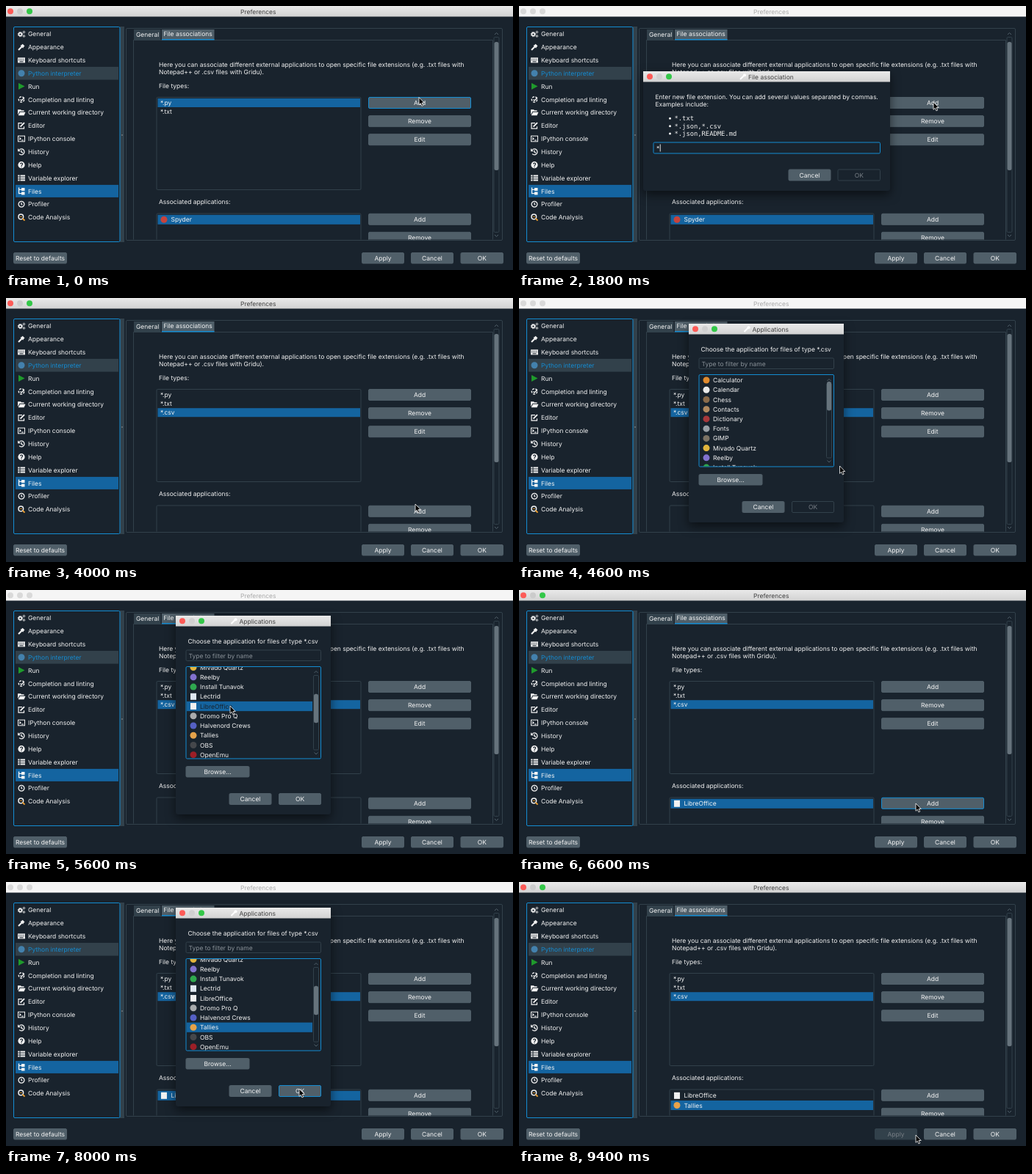
An HTML page that plays this animation: 690 px wide and 360 px high, repeating every 9600 ms.

```html
<!DOCTYPE html>
<html lang="en">
<head>
<meta charset="utf-8">
<title>Preferences</title>
<style>
  html, body { margin: 0; width: 100%; height: 100%; overflow: hidden; background: #19232d; }
  svg { display: block; width: 690px; height: 360px; }
  text { font: 8.47px Inter, "Open Sans", sans-serif; fill: #f4f4f4; white-space: pre; text-rendering: geometricPrecision; }
  .mono { font: 8.8px "DejaVu Sans Mono", monospace; }
  .dialog { filter: drop-shadow(0 5px 7px rgba(0, 0, 0, .55)); }
</style>
</head>
<body>
<svg id="stage" viewBox="0 0 690 360">
  <defs>
    <linearGradient id="bar" x2="0" y2="1"><stop stop-color="#e9e9e9"/><stop offset="1" stop-color="#d2d2d2"/></linearGradient>
    <clipPath id="pane"><path d="M164 31H663V318.500H164Z"/></clipPath>
    <clipPath id="apps"><path d="M246 105H417V229.500H246Z"/></clipPath>
  </defs>
</svg>
<script>
const BG = '#19232d', LINE = '#32414b', GREY = '#505f69', BLUE = '#148cd2', SEL = '#1464a0', WHITE = '#f4f4f4', DIM = '#787f86';
const LOOP = 9600, STEP = 200;
const stage = document.getElementById('stage');

function el(tag, attrs, parent = stage) {
  const node = document.createElementNS('http://www.w3.org/2000/svg', tag);
  set(node, attrs);
  parent.append(node);
  return node;
}
function set(node, attrs) {
  for (const key in attrs) node.setAttribute(key, attrs[key]);
}
const show = (node, on) => set(node, { visibility: on ? 'visible' : 'hidden' });
const group = (parent, attrs = {}) => el('g', attrs, parent);
const rect = (parent, x, y, width, height, fill, more = {}) => el('rect', { x, y, width, height, fill, ...more }, parent);
const frame = (parent, x, y, w, h, stroke, fill = 'none') =>
  rect(parent, x + .5, y + .5, w - 1, h - 1, fill, { stroke, rx: 1.5 });
const path = (parent, d, more = {}) => el('path', { d, fill: 'none', stroke: WHITE, ...more }, parent);
const dot = (parent, cx, cy, r, fill) => el('circle', { cx, cy, r, fill }, parent);

// Text is placed by its vertical middle.
function label(parent, x, mid, str, more = {}) {
  const node = el('text', { x, y: mid + 3.1, ...more }, parent);
  node.textContent = str;
  return node;
}

const buttons = [];
function button(parent, layer, x, y, w, h, str) {
  const box = frame(parent, x, y, w, h, GREY, GREY);
  const text = label(parent, x + w / 2, y + h / 2, str, { 'text-anchor': 'middle' });
  const b = { box, text, layer, x, y, w, h, enabled: true };
  buttons.push(b);
  return b;
}

function scrollbar(parent, x, top, bottom) {
  frame(parent, x - 4, top + 4, 8, bottom - top - 8, LINE);
  path(parent, `M${x - 2.5} ${top + 1}l2.500 -2.500l2.500 2.500M${x - 2.5} ${bottom - 1}l2.500 2.500l2.500 -2.500`, { stroke: GREY });
}

function badge(parent, x, y, fill, square) {
  return square ? rect(parent, x - 4, y - 4.5, 8, 9, fill) : dot(parent, x, y, 4.5, fill);
}

function titleBar(parent, x, y, w, str, textX) {
  const fill = rect(parent, x, y, w, 14.5, 'url(#bar)');
  const lights = ['#fc5b57', '#d0d0d0', '#33c748'].map((c, i) => dot(parent, x + 6 + 13 * i + (x ? 3 : 0), y + 7.2, 4, c));
  const text = label(parent, textX, y + 7.4, str, { style: 'fill:#404040' });
  return { fill, lights, text };
}

/* Main window */
rect(stage, 0, 0, 690, 360, BG);
const mainBar = titleBar(stage, 0, 0, 690, 'Preferences', 319);
const main = group(stage);

const gear = (x, y, r) => `<circle cx="${x}" cy="${y}" r="${r}" stroke-width="${r * .8}"/>` +
  `<circle cx="${x}" cy="${y}" r="${r * 1.6}" stroke-width="${r * .5}" stroke-dasharray="${r * .63}"/>`;
const line = (d, w = 1.2) => `<path d="${d}" stroke-width="${w}"/>`;
const solid = (d, c = WHITE) => `<path d="${d}" fill="${c}" stroke="none"/>`;
const sections = [
  ['General', gear(-1.6, .4, 2) + gear(3.4, -2.6, 1) + gear(3.4, 2.8, 1)],
  ['Appearance', line('M-4 4L1 -1', 2.2) + line('M1 -1L3 -3', 4) + line('M-1 -2.500L2.500 1')],
  ['Keyboard shortcuts', solid('M-5 -3.500H5V3.500H-5Z') +
    `<path d="M-4 -1.500H4.500M-4 .3H4.500" stroke="${BG}" stroke-dasharray="1 1"/><path d="M-2.500 2H2.500" stroke="${BG}"/>`],
  ['Python interpreter', '<circle r="4.500" fill="#4381ad" stroke="none"/>'],
  ['Run', solid('M-4 -4.500L4.500 0L-4 4.500Z', '#1f9a2c')],
  ['Completion and linting', '<circle r="3.700" stroke-width="1.400" stroke-dasharray="3 1.600"/>' + line('M-1.500 0L0 1.500L4 -2.500', 1.4)],
  ['Current working directory', solid('M-5 3V-4H-1L0 -3H3.500V-1.500H-2.500ZM-4.300 4L-2 -.5H5.500L3.500 4Z')],
  ['Editor', line('M1 -3.500H-4V4H3.500V1') + line('M-1.500 1.500L4 -4', 2)],
  ['IPython console', '<rect x="-4.500" y="-3.800" width="9" height="7.600"/>' + line('M-2.800 -1.500L-1 0L-2.800 1.500M0 2H3')],
  ['History', line('M-3 -2.700A4 4 0 1 1 -3 2.800M0 -2.200V.3L2 1.500', 1.3) + solid('M-5 -4.500V-.6H-1Z')],
  ['Help', `<circle r="4.600" fill="${WHITE}" stroke="none"/><path d="M-1.500 -1.200C-1.500 -3 1.700 -3 1.600 -1.200C1.500 0 0 0 0 1.200M0 2V3.200" stroke="${BG}" stroke-width="1.200"/>`],
  ['Variable explorer', line('M-4.800 -3H-2.500M-4.800 0H-2.500M-4.800 3H-2.500M-1.500 -3H5M-1.500 0H5M-1.500 3H5', 2)],
  ['Files', line('M-3.500 -5V3.200H0M-3.500 -2H0', 1.3) + solid('M0 -4.500H4.500V-.5H0ZM0 1H4.500V5H0Z')],
  ['Profiler', '<circle r="3.900" stroke-width="1.300"/>' + line('M0 -2.300V.5H1.500')],
  ['Code Analysis', '<circle cx="-.7" cy="-.7" r="3.300" stroke-width="1.500"/>' + `<path d="M1.500 1.500L4.500 4.500" stroke="#f0a030" stroke-width="2"/><path d="M-2.200 -.7H.8" stroke="#f0a030"/>`],
];
rect(main, 155, 28, 6, 294, LINE);
dot(main, 158, 176, .9, DIM);
frame(main, 10, 28, 145.5, 294, BLUE, BG);
sections.forEach(([name, icon], i) => {
  const y = 38.2 + 17.85 * i, hover = i === 3;
  if (hover) rect(main, 13, y - 8.8, 140, 17.6, LINE);
  if (name === 'Files') rect(main, 13, y - 8.5, 140, 17, SEL);
  group(main, { transform: `translate(21 ${y})`, fill: 'none', stroke: WHITE }).innerHTML = icon;
  label(main, 30, y, name, hover ? { style: 'fill:' + BLUE } : {});
});

frame(main, 163, 30, 513, 290, LINE);
const pane = group(main, { 'clip-path': 'url(#pane)' });
path(pane, 'M173.500 330V46.500H662.500V330', { stroke: LINE });
rect(pane, 174, 32, 36.500, 14, LINE);
rect(pane, 212, 32, 71.500, 14, GREY);
rect(pane, 212, 45, 71.500, 1.500, BLUE);
label(pane, 177, 38.7, 'General');
label(pane, 214.500, 38.2, 'File associations');
label(pane, 208, 79.8, 'Here you can associate different external applications to open specific file extensions (e.g. .txt files with');
label(pane, 208, 90.2, 'Notepad++ or .csv files with Gridu).');
label(pane, 208, 108.6, 'File types:');
label(pane, 208, 267.300, 'Associated applications:');
frame(pane, 204.500, 124, 279, 127, LINE);
frame(pane, 204.500, 282.500, 279, 60, LINE);
['Add', 'Remove', 'Edit'].forEach((s, i) => button(pane, 'main', 493, 124 + 25.1 * i, 140, 16, s));
['Add', 'Remove'].forEach((s, i) => button(pane, 'main', 493, 282.800 + 25.1 * i, 140, 16, s));
scrollbar(main, 667.5, 38, 313);
rect(main, 664.500, 49, 6, 175, '#66737c', { rx: 2.5 });

const typeSel = rect(pane, 206.500, 126, 275.500, 12, SEL);
const types = ['*.py', '*.txt', '*.csv'].map((s, i) => label(pane, 210, 132 + 12.1 * i, s));
const linkSel = rect(pane, 206.500, 284.800, 275.500, 13, SEL);
function link(name, row, fill, square) {
  const g = group(pane), y = 291.300 + 13.2 * row;
  badge(g, 215, y, fill, square);
  label(g, 224.500, y, name);
  return g;
}
const links = {
  spyder: link('Spyder', 0, '#c8433c'),
  office: link('LibreOffice', 0, '#f1f1f1', true),
  sheet: link('Tallies', 1, '#e5a24a'),
};

button(main, 'main', 10, 336, 73, 15.500, 'Reset to defaults');
const apply = button(main, 'main', 484, 336, 58, 15.500, 'Apply');
button(main, 'main', 551, 336, 58, 15.500, 'Cancel');
button(main, 'main', 618.500, 336, 58.500, 15.500, 'OK');

/* Dialogs */
function dialog(x, y, w, h, title, textX) {
  const g = group(stage, { class: 'dialog' });
  rect(g, x, y, w, h, BG, { rx: 3 });
  titleBar(g, x, y, w, title, textX);
  path(g, `M${textX - 11} ${y + 11}l5 -5`, { stroke: '#fff', 'stroke-width': 2 });
  dot(g, textX - 5, y + 5.2, 2, '#fff');
  return g;
}

const ext = dialog(169, 89, 336, 163, 'File association', 312);
label(ext, 185.500, 123.7, 'Enter new file extension. You can add several values separated by commas.');
label(ext, 185.500, 134.2, 'Examples include:');
['*.txt', '*.json,*.csv', '*.json,README.md'].forEach((s, i) => {
  dot(ext, 205.500, 153.3 + 10.4 * i, 1.5, WHITE);
  label(ext, 211.500, 153.200 + 10.4 * i, s, { class: 'mono' });
});
frame(ext, 182.500, 185.500, 309.500, 16, BLUE);
const typed = label(ext, 187, 193.500, '');
const caret = rect(ext, 187, 188.500, .9, 10, WHITE);
button(ext, 'ext', 366.500, 222.500, 58, 16, 'Cancel');
const extOk = button(ext, 'ext', 433.500, 222.500, 58.500, 16, 'OK');

const ROW = 13.23;
const apps = dialog(231, 35, 211, 271, 'Applications', 317.5);
label(apps, 247.500, 70, 'Choose the application for files of type *.csv');
frame(apps, 244.500, 81.500, 184.500, 15.500, LINE);
label(apps, 248.500, 89.5, 'Type to filter by name', { style: 'fill:#8a9299' });
frame(apps, 244.500, 104, 184.500, 126.500, BLUE);
const clip = group(apps, { 'clip-path': 'url(#apps)' });
const list = group(clip);
const rows = [
  ['Calculator', '#e08a2e'], ['Calendar', '#e9e9e9'], ['Chess', '#8b6b4a'], ['Contacts', '#b28a60'],
  ['Dictionary', '#a8383b'], ['Fonts', '#9aa0a6'], ['GIMP', '#7d7364'], ['Mivado Quartz', '#e3b53c'],
  ['Reelby', '#8272cf'], ['Install Tunavok', '#2fa84f'], ['Lectrid', '#dfe8f2', 1], ['LibreOffice', '#f1f1f1', 1],
  ['Dromo Pro Q', '#a9abad'], ['Halvenord Crews', '#5560c4'], ['Tallies', '#e5a24a'], ['OBS', '#45474b'], ['OpenEmu', '#9c1f27'],
].map(([name, fill, square], i) => {
  const y = 112 + ROW * i;
  const back = rect(list, 246, y - ROW / 2, 171, ROW, SEL);
  badge(list, 255, y, fill, square);
  return { back, text: label(list, 264, y, name) };
});
scrollbar(apps, 422, 112, 222.5);
const thumb = rect(apps, 419, 114, 6, 39.500, '#66737c', { rx: 2.5 });
button(apps, 'apps', 244.500, 240, 87, 15.500, 'Browse...');
button(apps, 'apps', 303.500, 277, 58, 16, 'Cancel');
const appsOk = button(apps, 'apps', 371, 277, 58, 16, 'OK');

const pointer = path(stage, 'M0 0V10.300L2.300 8.200L3.900 11.900L5.700 11.100L4.100 7.500H7.200Z', { fill: '#000', stroke: '#fff', 'stroke-width': .8 });

/* Timeline */
const cursorKeys = [
  [0, 562, 124.5], [200, 564, 131], [2400, 564, 131], [2800, 463, 229], [3200, 463, 229],
  [3600, 545, 265], [4000, 557, 281], [4200, 558, 288], [4400, 558, 288], [4800, 315, 170],
  [5400, 305, 158], [5600, 305, 158], [6000, 399, 282], [6200, 399, 282], [6600, 540, 291],
  [7000, 540, 291], [7400, 310, 190], [7600, 305, 197], [8000, 399, 282], [8200, 399, 282], [8400, 540, 345],
];
const scrollKeys = [[4800, 0], [5200, 99], [6200, 99], [6400, 0], [7200, 0], [7400, 99]];
const typing = [[0, ''], [1800, '*'], [2000, '*.'], [2200, '*.cs'], [2400, '*.csv']];

function tween(keys, t) {
  const i = keys.findIndex(k => k[0] > t);
  if (i < 0) return keys[keys.length - 1].slice(1);
  if (!i) return keys[0].slice(1);
  const a = keys[i - 1], b = keys[i];
  const p = (t - a[0]) / (b[0] - a[0]), e = p * p * (3 - 2 * p);
  return a.slice(1).map((v, n) => v + (b[n + 1] - v) * e);
}
const within = (t, from, to) => t >= from && t < to;

function render(t) {
  const extOpen = within(t, 800, 3200);
  const appsOpen = within(t, 4400, 6200) || within(t, 7000, 8200);
  const layer = extOpen ? 'ext' : appsOpen ? 'apps' : 'main';
  const [x, y] = tween(cursorKeys, t);
  const idle = layer !== 'main';

  set(mainBar.fill, { fill: idle ? '#f5f5f5' : 'url(#bar)' });
  set(mainBar.text, { style: 'fill:' + (idle ? '#aaa' : '#404040') });
  mainBar.lights.forEach((c, i) => set(c, { fill: idle ? '#d9d9d9' : ['#fc5b57', '#cbcbcb', '#33c748'][i] }));
  show(ext, extOpen);
  show(apps, appsOpen);

  const added = t >= 3200, office = t >= 6200, sheet = t >= 8200;
  show(types[2], added);
  set(typeSel, { y: added ? 150.2 : 126 });
  show(links.spyder, !added);
  show(links.office, office);
  show(links.sheet, sheet);
  show(linkSel, !added || office);
  set(linkSel, { y: sheet ? 298 : 284.8 });

  const str = typing.filter(k => k[0] <= t).pop()[1];
  typed.textContent = str;
  set(caret, { x: 187.5 + (str ? typed.getComputedTextLength() : 0) });

  const picked = within(t, 5400, 6200) ? 11 : within(t, 7600, 8200) ? 14 : -1;
  const [scroll] = tween(scrollKeys, t);
  set(list, { transform: `translate(0 ${-scroll})` });
  set(thumb, { y: 114 + scroll * .28 });
  const inList = layer === 'apps' && within(x, 246, 417) && within(y, 105, 229);
  const over = inList ? Math.floor((y + scroll - 112) / ROW + .5) : -1;
  rows.forEach((r, i) => {
    const on = i === picked, hot = i === over;
    set(r.back, { fill: on ? SEL : hot ? LINE : 'none' });
    set(r.text, { style: 'fill:' + (hot ? (on ? BG : BLUE) : WHITE) });
  });

  extOk.enabled = str.length > 2;
  appsOk.enabled = picked >= 0;
  apply.enabled = t < 8800;
  for (const b of buttons) {
    const hot = b.enabled && b.layer === layer && within(x, b.x, b.x + b.w) && within(y, b.y, b.y + b.h);
    const off = b === apply ? LINE : BG;
    set(b.box, { fill: b.enabled ? GREY : off, stroke: hot ? BLUE : b.enabled ? GREY : LINE });
    set(b.text, { style: 'fill:' + (b.enabled ? WHITE : DIM) });
  }
  set(pointer, { transform: `translate(${x} ${y})` });
}

const start = performance.now();
let last = -1;
function tick() {
  const t = Math.floor(((performance.now() - start) % LOOP) / STEP) * STEP;
  if (t !== last) render(last = t);
  requestAnimationFrame(tick);
}
tick();
</script>
</body>
</html>
```
